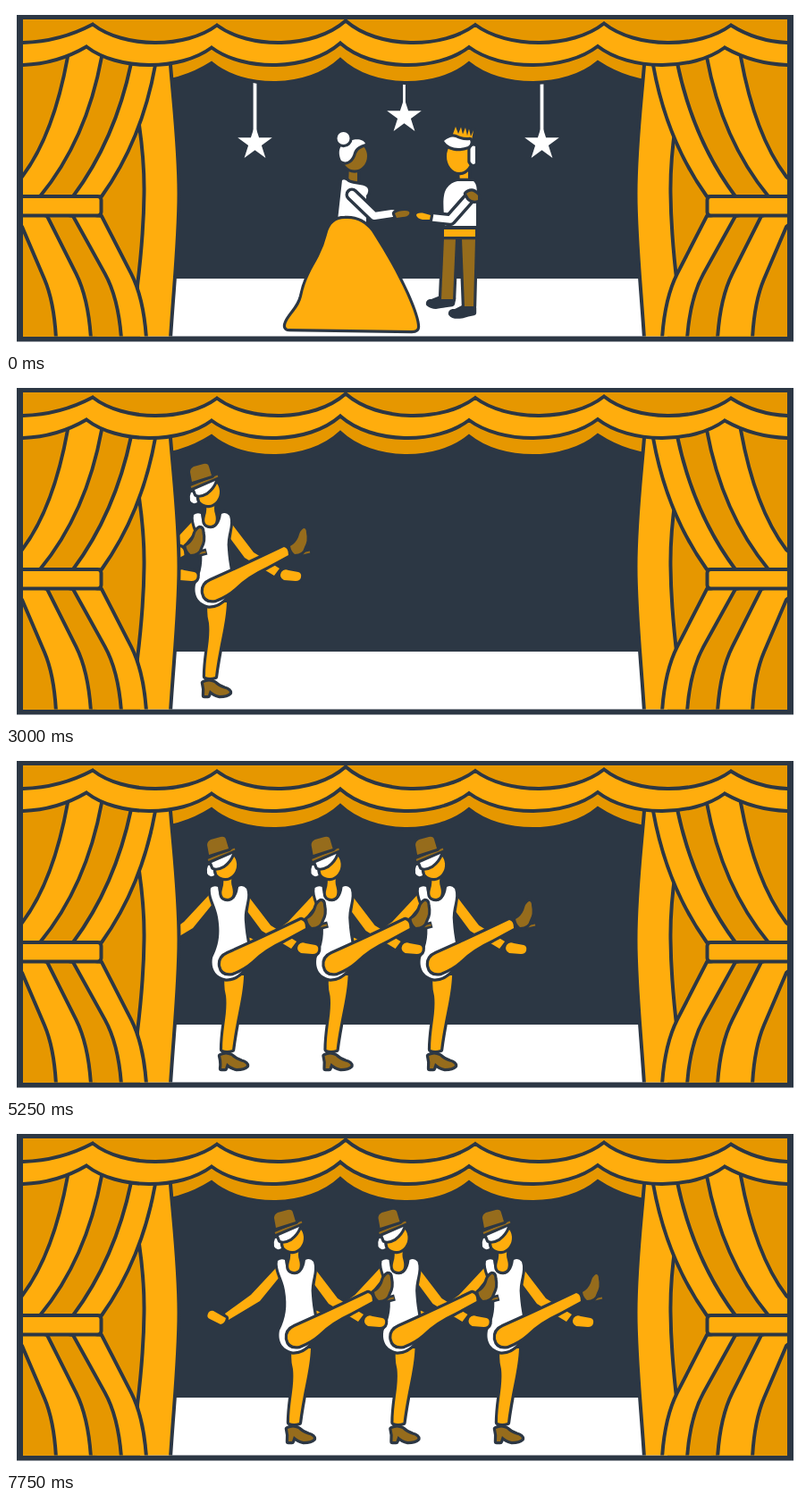
An HTML page that plays this animation: 895 px wide and 386 px high, repeating every 8000 ms.

```html
<!DOCTYPE html>
<html lang="en">
<head>
<meta charset="utf-8">
<title>Stage</title>
<style>
html, body { margin: 0; width: 100%; height: 100%; overflow: hidden; background: #fff; }
svg { display: block; width: 895px; height: 386px; }
.part { stroke: #2c3744; stroke-width: 6.4; stroke-linejoin: round; paint-order: stroke; }
.cloth { stroke: #2c3744; stroke-width: 4; }
</style>
</head>
<body>
<svg id="stage" viewBox="0 0 895 386" xmlns="http://www.w3.org/2000/svg"></svg>
<script>
const INK = '#2c3744', GOLD = '#ffad0d', AMBER = '#e69700', BROWN = '#966c1c', WHITE = '#fff';
const LOOP = 8000, STEP = 250, GAP = 116.5;

const part = (d, fill) => `<path class="part" d="${d}" fill="${fill}"/>`;
const cloth = (d, fill) => `<path class="cloth" d="${d}" fill="${fill}"/>`;
const line = (d, w, color, cap = 'butt') =>
  `<path d="${d}" fill="none" stroke="${color}" stroke-width="${w}" stroke-linecap="${cap}" stroke-linejoin="round"/>`;
const limb = (d, w, color) => line(d, w + 7, INK, 'round') + line(d, w, color, 'round');

function star(x, y, w) {
  const pts = [];
  for (let i = 0; i < 10; i++) {
    const r = i % 2 ? 7.8 : 20.3, a = i * Math.PI / 5;
    pts.push((x + r * Math.sin(a)).toFixed(1) + ',' + (y - r * Math.cos(a)).toFixed(1));
  }
  return line(`M${x} 40V${y - 12}`, w, WHITE) + `<polygon points="${pts.join(' ')}" fill="${WHITE}"/>`;
}

// Hanging cloth whose lower edge runs through the given peaks
function scallop(peaks, dip, x0, x1, top, fill) {
  const [fx, fy] = peaks[0];
  let d = `M${x0} ${top}V${dip}Q${(x0 + fx) / 2 + 3} ${dip} ${fx} ${fy}`;
  for (let i = 1; i < peaks.length; i++) {
    const [px, py] = peaks[i - 1], [x, y] = peaks[i];
    const w = (x - px) * 0.25, low = (4 * dip - (py + y) / 2) / 3;
    d += `C${px + w} ${low} ${x - w} ${low} ${x} ${y}`;
  }
  const [lx] = peaks[peaks.length - 1];
  return cloth(d + `Q${(lx + x1) / 2 - 3} ${dip} ${x1} ${dip}V${top}Z`, fill);
}

// Left side curtain; s shifts the long inner panel
function drape(s) {
  const upper = (x, cx, cy, ex, ey, y, fill) =>
    cloth(`M0 40H${x}V${y}Q${cx} ${cy} ${ex} ${ey}L0 ${ey + 15}Z`, fill);
  const lower = (x, y, ex, fill) => {
    const w = ex - x, h = 372 - y;
    return cloth(`M0 ${y - 15}L${x} ${y}l${w * 0.66} ${h * 0.47}Q${x + w * 0.94} ${y + h * 0.67} ${ex} 372V380H0Z`, fill);
  };
  return cloth(`M100 40H${184 + s}V66C${188 + s} 115 ${193.5 + s} 160 ${193.5 + s} 210C${193.5 + s} 260 ${188 + s} 310 ${184 + s} 372H100Z`, GOLD)
    + cloth(`M100 120H${145 + s}L${149 + s} 133Q${155 + s} 175 ${154.5 + s} 210Q${154 + s} 255 ${147 + s} 313V322H100Z`, AMBER)
    + upper(167, 152, 150, 107, 213, 66, GOLD)
    + upper(140, 122, 150, 75, 213, 64, AMBER)
    + upper(107, 90, 150, 38, 213, 57, GOLD)
    + upper(69, 53, 145, 18, 191, 57, AMBER)
    + lower(107, 235, 157, GOLD)
    + lower(75, 235, 129, AMBER)
    + lower(46, 235, 95, GOLD)
    + lower(18, 247, 56, AMBER)
    + `<rect class="cloth" x="0" y="213" width="106.500" height="21.500" rx="4" fill="${GOLD}"/>`;
}

const lady =
  part('M384 178H393V200H383Z', BROWN)
  + part('M376 168A14 15.5 0 0 1 404 168A14 15.5 0 0 1 376 168Z', BROWN)
  + part('M375 173C370 162 374 153 384 151C392 148 400 149 402 154C396 156 391 158 389 164C387 172 381 177 375 173Z', WHITE)
  + part('M370.500 148A7 7 0 0 1 384.500 148A7 7 0 0 1 370.500 148Z', WHITE)
  + part('M371 240L376 195Q379 193 383 197C389 200 400 199 404 203Q407 207 403 212V242Z', WHITE)
  + part('M359 256C362 243 369 238 379 238C393 237 402 243 409 252C425 277 437 298 448 322C456 340 460 352 460 359Q460 363 454 363L317 361Q311 361 314 354C318 345 328 338 331 325C335 305 342 295 350 280Q356 268 359 256Z', GOLD)
  + limb('M387 211L412 235L432 232', 8, WHITE)
  + part('M435 232Q439 229 446 229Q453 229 451 233Q449 236 444 236L437 237Z', BROWN);

const prince =
  part('M473 333Q473 331 477 331L487 327H500L499 333Q490 334 486 335Q478 337 473 333Z', INK)
  + part('M498 344Q498 342 503 342L511 338H523V343Q516 344 511 346Q501 348 498 344Z', INK)
  + part('M490 260H503L500 328H487Z', BROWN)
  + part('M510 260H525L523 336H513Z', BROWN)
  + part('M490 250H525V258H490Z', GOLD)
  + part('M507 182H517V198H508Z', GOLD)
  + part('M491 246C489 225 488 211 493 204Q498 197 505 196H523C528 200 527 210 526 220V246Z', WHITE)
  + part('M493 168A14 17 0 0 1 521 168A14 18 0 0 1 493 168Z', GOLD)
  + part('M519.500 160Q521 155 525 157V176Q522 179 519.500 174Z', WHITE)
  + part('M499 146L503 135L506 143L509 135.500L511 143.500L514 136L516 145L518 137.500L520 146L523 139L521 150Z', GOLD)
  + part('M490 151Q497 145 503 147Q511 151 519 150Q521 154 517 157C506 161 495 159 490 151Z', WHITE)
  + limb('M520 213L497 239L478 237', 7.5, WHITE)
  + part('M515 210Q521 204 528 212V217Q522 219 518 215Z', BROWN)
  + part('M475 234L466 231.500Q459 231 459 234Q460 238 466 239L474 239Z', GOLD);

const dancer =
  // arms
  part('M302 160L274 190L245 211L249 218L284 197L306 170Z', GOLD)
  + part('M246 216L232 208Q228 207 226 211Q224 215 228 217L240 223Q245 222 246 216Z', GOLD)
  + part('M345 160L371 194L400 212L394 220L361 200L341 173Z', GOLD)
  + part('M402 216Q405 212 410 214L421 216Q425 217 424 222Q423 226 418 226L405 225Q399 222 402 216Z', GOLD)
  // standing leg
  + part('M320 250H341C340 275 333 295 328 333Q322 335 317 333C317 310 323 292 321 273Q318 262 320 250Z', GOLD)
  + part('M315 340Q321 337 327 340Q331 344 338 346.500Q344 348 344 351Q341 354 333 354Q327 353 322 348L320 354H316Q317 347 315 340Z', BROWN)
  // body
  + part('M304 152Q308 149 312 151Q313 165 322 167Q333 167 335 151Q340 148 344 153C348 164 340 175 342 191C343 208 347 219 347 232C342 245 332 254 321 253.500C308 251 304 241 306 230C313 216 315 203 312 185C310 172 302 162 304 152Z', WHITE)
  + part('M318 138H328Q326 146 328 151Q331 163 323 164Q314 164 317 153Q319 147 318 138Z', GOLD)
  // head
  + part('M307 127A13 14 0 0 1 333 125A13 15 0 0 1 307 127Z', GOLD)
  + part('M301 127L307 126Q306 133 308 138Q303 141 300 136Q299 131 301 127Z', WHITE)
  + part('M305 124L328 114Q325 122 318 127Q311 131 307 129Z', WHITE)
  + line('M300 121L331 108', 6, INK) + line('M301 121L331 108.500', 2, BROWN)
  + part('M302 115L300 104Q300 100 304 98L315 95Q320 94 321 98L324 108Z', BROWN)
  // raised leg
  + part('M323 226L354 212Q382 199 405 188Q410 189 410 197L386 210Q364 220 350 234Q341 242 328 247Q317 249 315 239Q314 230 323 226Z', GOLD)
  + line('M424 196L435 193', 7, INK) + line('M423 196L434 193.500', 1.8, BROWN)
  + part('M412 187Q418 184 421 177Q423 169 427 167Q430 167 430 172Q432 181 428 188Q426 196 417 196Q413 193 412 187Z', BROWN);

const hemA = [[97, 20.5], [236, 21.5], [380, 16.5], [525, 21], [669, 19.5], [811, 21.5]];
const hemB = [[90, 45.5], [230, 46.5], [374, 41.5], [518, 46], [662, 45], [804, 46.5]];
const hemC = [[230, 64], [374, 60], [518, 64], [662, 63]];

document.getElementById('stage').innerHTML = `
  <defs>
    <clipPath id="inner"><rect x="19" y="15" width="855" height="354.500"/></clipPath>
    <clipPath id="scene"><rect x="150" y="15" width="590" height="354.500"/></clipPath>
  </defs>
  <rect x="12" y="10" width="869" height="365.500" fill="${INK}"/>
  <rect x="150" y="305" width="590" height="64.500" fill="${WHITE}"/>
  <g clip-path="url(#scene)">
    <g id="couple">
      ${star(278.500, 153.500, 3.8)}${star(445.500, 123.500, 2.8)}${star(599.500, 153.500, 3.8)}
      ${lady}${prince}
    </g>
    <g id="troupe">
      ${[2, 1, 0].map(i => `<g transform="translate(${i * GAP})">${dancer}</g>`).join('')}
    </g>
  </g>
  <g clip-path="url(#inner)">
    ${scallop(hemC, 86, 155, 738, 40, AMBER)}
    ${drape(0)}
    <g transform="matrix(-1 0 0 1 891 0)">${drape(-7)}</g>
    ${scallop(hemB, 66, 14, 879, 5, GOLD)}
    ${scallop(hemA, 41, 14, 879, 5, AMBER)}
  </g>`;

const couple = document.getElementById('couple');
const troupe = document.getElementById('troupe');
const slide = (el, x) => el.setAttribute('transform', `translate(${x.toFixed(2)})`);

// The couple speeds up to the left, then the dancers glide in and slow down
function draw(ms) {
  const t = Math.floor(ms % LOOP / STEP) * STEP / 1000;
  slide(couple, -2.63 * ((t + 1.6) ** 4 - 1.6 ** 4));
  slide(troupe, 6.4 - 0.10153 * (10.57 - t) ** 4);
}

const start = performance.now();
function tick() {
  draw(performance.now() - start);
  requestAnimationFrame(tick);
}
draw(0);
requestAnimationFrame(tick);
</script>
</body>
</html>
```
